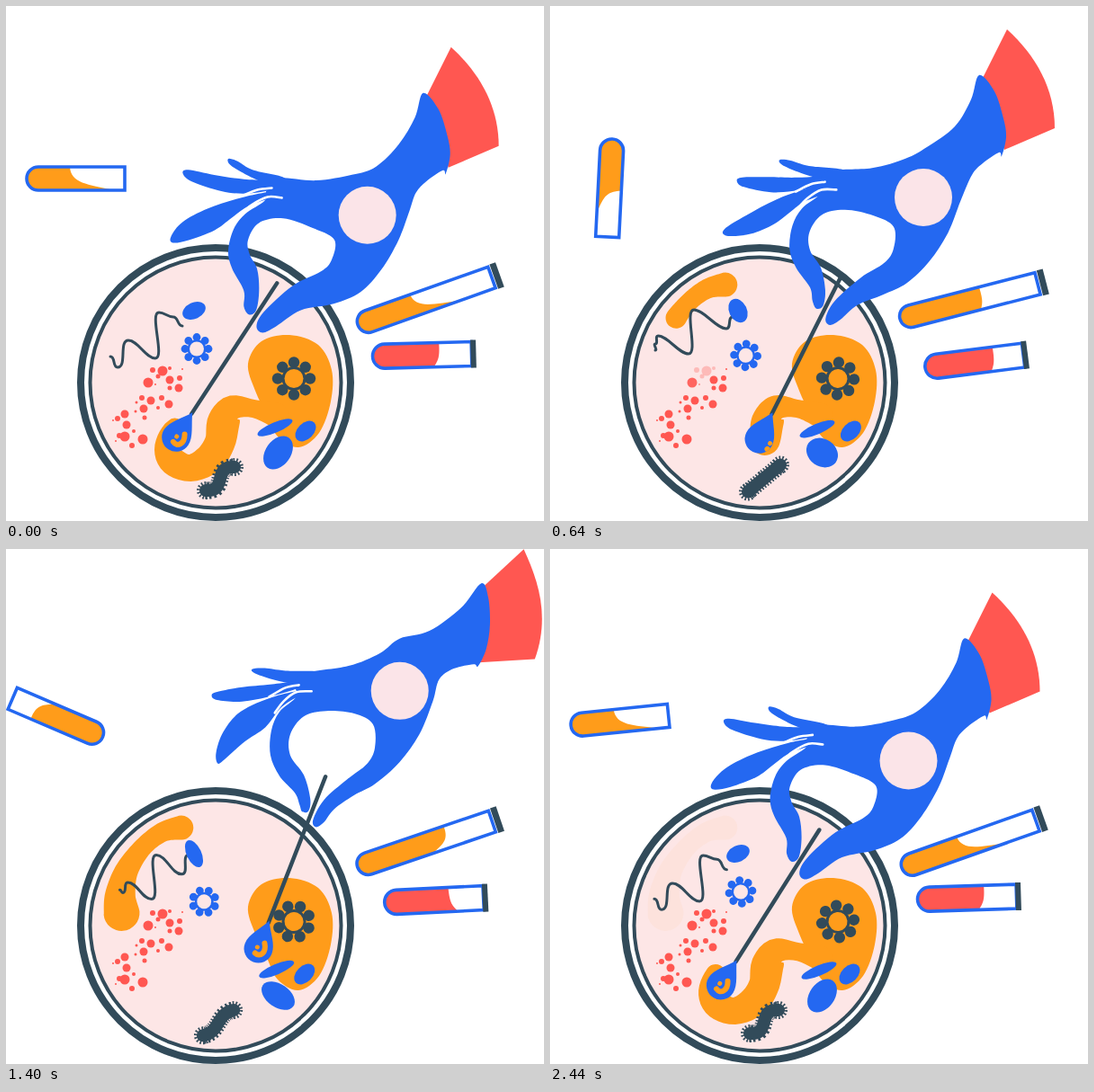
Recreate the animation shown at these times as an HTML page. Size 598x573 px, loop 2.48 s.

```html
<!DOCTYPE html>
<html lang="en">
<head>
<meta charset="utf-8">
<title>Petri dish</title>
<style>
html, body { margin: 0; width: 100%; height: 100%; overflow: hidden; background: #fff; }
svg { display: block; }
</style>
</head>
<body>
<svg id="stage" width="598" height="573" viewBox="0 0 598 573"></svg>
<script>
const LOOP = 2480, STEP = 40;
const BLUE = '#2468f1', ORANGE = '#ff9c1a', RED = '#ff5751', DARK = '#324b5a', PINK = '#fde6e6';
const stage = document.getElementById('stage');

function set(node, attrs) {
  for (const k in attrs) node.setAttribute(k, attrs[k]);
  return node;
}
function add(tag, attrs, parent = stage) {
  return parent.appendChild(set(document.createElementNS('http://www.w3.org/2000/svg', tag), attrs));
}
const fill = (color, parent) => add('path', { fill: color }, parent);
const line = (color, width, parent) => add('path', {
  fill: 'none', stroke: color, 'stroke-width': width, 'stroke-linecap': 'round', 'stroke-linejoin': 'round'
}, parent);
const pts = s => s.split(' ').map(p => p.split(',').map(Number));
const lerp = (a, b, k) => a + (b - a) * k;
const mix = (a, b, k) => a.map((v, i) => lerp(v, b[i], k));
const clamp = (v, a, b) => Math.max(a, Math.min(b, v));
const fmt = p => p.map(v => v.toFixed(2)).join(' ');

// Smooth looping track through rows of [time, ...values]
function track(rows, t) {
  const n = rows.length;
  t = ((t % LOOP) + LOOP) % LOOP;
  let i = n - 1;
  while (rows[i][0] > t) i--;
  const at = j => {
    const r = rows[(j + n) % n], turn = Math.floor(j / n) * LOOP;
    return [r[0] + turn, ...r.slice(1)];
  };
  const [a, b, c, d] = [at(i - 1), at(i), at(i + 1), at(i + 2)];
  const w = c[0] - b[0], k = (t - b[0]) / w, k2 = k * k, k3 = k2 * k;
  return b.slice(1).map((v, j) => {
    j++;
    const m0 = (c[j] - a[j]) / (c[0] - a[0]) * w, m1 = (d[j] - b[j]) / (d[0] - b[0]) * w;
    return v * (2 * k3 - 3 * k2 + 1) + m0 * (k3 - 2 * k2 + k) + c[j] * (3 * k2 - 2 * k3) + m1 * (k3 - k2);
  });
}

// Rounded path through points
function smooth(p, closed = true) {
  const n = p.length, get = i => closed ? p[(i + n) % n] : p[clamp(i, 0, n - 1)];
  let d = 'M' + fmt(p[0]);
  for (let i = 0; i < (closed ? n : n - 1); i++) {
    const [a, b, c, e] = [get(i - 1), get(i), get(i + 1), get(i + 2)];
    d += 'C' + fmt(b.map((v, j) => v + (c[j] - a[j]) / 6)) + ' ' +
      fmt(c.map((v, j) => v - (e[j] - b[j]) / 6)) + ' ' + fmt(c);
  }
  return d + (closed ? 'Z' : '');
}

// Point [x, y, radius] on a curve at index u
function along(p, u) {
  u = clamp(u, 0, p.length - 1);
  const i = Math.min(Math.floor(u), p.length - 2), k = u - i;
  const a = p[Math.max(i - 1, 0)], b = p[i], c = p[i + 1], d = p[Math.min(i + 2, p.length - 1)];
  return b.map((v, j) => v + .5 * k * (c[j] - a[j] +
    k * (2 * a[j] - 5 * v + 4 * c[j] - d[j] + k * (3 * (v - c[j]) + d[j] - a[j]))));
}

// Smear of changing width, drawn up to index end
function ribbon(p, end) {
  if (end < .02) return '';
  const left = [], right = [], n = 48;
  let r0, r1;
  for (let i = 0; i <= n; i++) {
    const u = end * i / n, [x, y, r] = along(p, u);
    const a = along(p, u - .02), b = along(p, u + .02);
    const dx = b[0] - a[0], dy = b[1] - a[1], l = Math.hypot(dx, dy) || 1;
    left.push([x + dy / l * r, y - dx / l * r]);
    right.unshift([x - dy / l * r, y + dx / l * r]);
    if (!i) r0 = r;
    r1 = r;
  }
  return 'M' + left.map(fmt).join('L') + `A${r1} ${r1} 0 0 1 ` + right.map(fmt).join('L') +
    `A${r0} ${r0} 0 0 1 ${fmt(left[0])}Z`;
}

// ---- Dish
add('circle', { cx: 233, cy: 419, r: 150, fill: '#fff', stroke: DARK, 'stroke-width': 8 });
add('circle', { cx: 233, cy: 419, r: 139.5, fill: PINK, stroke: DARK, 'stroke-width': 4 });

const arcPts = pts('195,310,13.5 174,315,11 152,332,10.5 134,358,13 127,385,17 128.5,405,20');
const arc = fill(ORANGE);
const arcKeys = [[0, 0], [380, 0], [440, .45], [640, 2.6], [1120, 5], [1300, 5], [2470, 5]];

// x, y, radius, moment of blinking
const dots = pts('174,406,5.5,640 182,403,2,640 163,405,3,640 169,412,2.5,640 158,419,5.5,760 ' +
  '182,416,4.5,880 193,414,3,1000 192,425,4.5,1120 182,425,2.5,1000 196,404,1,1000 166,421,1,700 ' +
  '181,443,4.5,440 173,436,3,400 169,447,2,1120 161,439,4.5,1640 151,436,3,1600 153,448,4.5,1700 ' +
  '145,441,1.5,1640 144,451,1.5,1800 154,458,2.5,1800 132,454,4.5,2080 124,459,3,2040 134,466,4.5,2080 ' +
  '142,473,2,2120 126,478,3,2080 132,479,5.5,2100 140,489,3,2140 152,482,5.5,2200 119,461,1,2000 122,484,1,2080')
  .map(([cx, cy, r, at]) => ({ at, node: add('circle', { cx, cy, r, fill: RED }) }));

const squiggle = line(DARK, 3);
const squiggleKeys = [
  [0, 116, 390, 124, 402, 136, 372, 166, 392, 170, 341, 186, 346, 196, 356],
  [440, 116, 384, 116, 383, 119, 378, 143, 395, 150, 348, 190, 378, 193, 340],
  [640, 117, 383, 117, 376, 120, 367, 154, 387, 160, 338, 196, 359, 203, 346],
  [1120, 124, 377, 130, 382, 138, 359, 174, 381, 177, 328, 192, 337, 205, 349],
  [1640, 127, 383, 128, 382, 131, 381, 151, 397, 158, 351, 199, 383, 203, 336],
  [2080, 122, 391, 126, 380, 131, 373, 163, 395, 167, 343, 204, 368, 212, 362],
  [2420, 116, 389, 124, 400, 136, 372, 166, 392, 170, 341, 186, 346, 197, 357]
];
function wave(v) {
  let d = `M${v[0]} ${v[1]}`;
  for (let i = 2; i < v.length; i += 2) {
    const [x, y, u, w] = v.slice(i - 2, i + 2), h = Math.min(11, Math.hypot(u - x, w - y) * .4);
    d += `C${x + h} ${y} ${u - h} ${w} ${u} ${w}`;
  }
  return d;
}

const cell = add('ellipse', { fill: BLUE, transform: 'translate(209 339) rotate(-25)' });

function flower(color, core, petal, dist, disc, hole) {
  const g = add('g', {});
  for (let i = 0; i < 8; i++)
    add('circle', { cx: dist, r: petal, fill: color, transform: `rotate(${i * 45})` }, g);
  add('circle', { r: disc, fill: color }, g);
  add('circle', { r: hole, fill: core }, g);
  return g;
}
const blueFlower = flower(BLUE, PINK, 4.4, 13, 10.5, 8);

add('path', { fill: ORANGE, d: smooth(pts('315,366 347,377 362,405 361,440 348,475 325,491 302,479 290,455 277,428 269,398 284,373')) });
const trailPts = pts('300,455,14 275,448,10 252,447,14 242,462,18 238,485,17 226,504,17 205,514,15 186,507,15.5 179,492,14 184,473,11 196,460,7');
const trail = fill(ORANGE);
const darkFlower = flower(DARK, ORANGE, 6.2, 18, 13.5, 10.5);
const leafA = add('ellipse', { rx: 21, ry: 5.8, fill: BLUE });
const leafB = add('ellipse', { rx: 13.5, ry: 9, fill: BLUE });
const bean = add('ellipse', { fill: BLUE, transform: 'translate(302.5 497) rotate(-55)' });
// roundness of the cells, leaf shift, bug bend
const cellKeys = [[0, 1, 0, 1], [440, .55, -2, 0], [640, .3, -2, 0], [1120, 0, 0, 1],
  [1640, .05, 3, .1], [2080, .55, 3, 0], [2440, 1, 0, 1]];

const bugHair = add('path', { fill: 'none', stroke: DARK, 'stroke-width': 19, 'stroke-dasharray': '1.6 2' });
const bugTips = [0, 1].map(() => add('circle', { r: 8, fill: 'none', stroke: DARK, 'stroke-width': 4, 'stroke-dasharray': '1.6 2' }));
const bugBody = line(DARK, 14);

const drop = add('path', { fill: ORANGE, d: 'M0 0C7 12 9 26 8 38A8 8 0 0 1 -8 38C-7 24 -3 12 0 0Z' });

// ---- Swab
const stick = line(DARK, 4.5);
const headShape = 'M0 -2C6 10 16 20 16 31A16 16 0 0 1 -16 31C-16 20 -6 10 0 -2Z';
add('path', { d: headShape }, add('clipPath', { id: 'head' }));
const head = add('g', {});
add('path', { d: headShape, fill: BLUE }, head);
const swirl = add('g', {}, add('g', { 'clip-path': 'url(#head)' }, head));
set(line(ORANGE, 6, swirl), { d: 'M3 -8C9 1 4 9 -3 6' });
add('circle', { cx: -3, cy: -1, r: 2.5, fill: ORANGE }, swirl);
const swirlKeys = [[0, 3], [440, -13], [640, 16], [1120, -12], [1640, 12], [2080, -14], [2440, 1]];

// ---- Hand: low and high poses, relative to the badge
const low = s => pts(s).map(([x, y]) => [x - 402, y - 233]);
const high = s => pts(s).map(([x, y]) => [x - 437, y - 159]);
const cuff = [low('495,46 527,75 548,112 548,156 492,180 468,100'),
  high('574,1 590,35 604,75 587,123 525,127 529,43')];
const body = [
  low('464,97 481,115 491,145 494,166 489,187 486,183 468,195 456,208 449,228 437,260 418,293 395,318 ' +
    '365,331 328,338 300,356 285,363 278,356 286,340 318,311 350,295 362,282 365,260 341,247 308,236 ' +
    '281,241 269,260 271,276 279,292 281,315 278,337 270,343 264,334 264,316 251,291 247,272 253,248 ' +
    '266,231 288,216 290,205 300,191 345,194 385,188 412,179 437,154 455,124'),
  high('527,39 535,55 537,85 533,112 524,131 519,129 497,134 481,146 474,170 459,207 437,238 410,262 ' +
    '386,275 364,290 352,305 343,310 340,302 352,280 378,257 400,240 409,222 407,196 386,184 355,181 ' +
    '330,187 315,207 315,230 330,252 337,278 335,292 328,293 325,285 320,272 303,253 293,230 294,203 ' +
    '303,182 322,165 320,150 330,139 380,131 415,117 437,101 470,92 505,66')
];
const little = [low('310,191 275,182 258,172 248,169 249,175 262,184 280,193 310,204'),
  high('355,138 310,136 287,133 273,134 277,139 298,146 318,150 345,152')];
const ring = [low('315,195 265,192 232,187 203,181 197,185 207,194 240,205 268,208 300,203'),
  high('345,145 295,151 262,154 234,159 228,163 234,168 262,170 295,164 325,155')];
const long = [low('310,204 265,212 224,225 196,240 184,256 186,263 203,260 232,249 250,236 270,222 300,211'),
  pts('310,227 285,228 240,243 205,261 180,276 183,283 210,281 237,270 258,254 272,245 300,235').map(([x, y]) => [x - 402, y - 242]),
  high('350,154 300,164 261,181 241,203 232,226 234,238 243,233 265,214 288,198 306,176 330,162')];
const creaseA = [low('296,202 280,204 264,210'), high('325,152 310,155 292,165')];
const creaseB = [low('307,213 291,212 273,221 259,233'), high('339,159 322,160 308,170 298,183')];

const hand = add('g', {});
const cuffNode = fill(RED, hand);
const [littleNode, ringNode, longNode, bodyNode] = [0, 0, 0, 0].map(() => fill(BLUE, hand));
const creases = [line('#fff', 2.6, hand), line('#fff', 2.6, hand)];
add('circle', { r: 32, fill: '#fbe4e8' }, hand);

// delay from the turning point, x, y, finger pose, arm pose, smear length
const there = [
  [0, 403, 232, 0, 0, 9.4], [70, 398.5, 235.5, .1, 0, 9], [220, 390, 250, .28, -.02, 7],
  [410, 402, 242, .55, -.05, 4.6], [610, 415, 213, .57, 0, 3.9], [870, 426, 181, .52, .66, 1.9],
  [1090, 437, 159, 1, 1, 0], [1240, 440, 156, 1.03, 1.05, 0]
];
const back = there.slice(1, -1).reverse().map(([d, ...v]) => [LOOP - d, ...v]);
const handKeys = there.concat(back);

function pose(parts, k) {
  if (parts.length === 3) {
    const j = k < .55 ? 0 : 1;
    return parts[j].map((p, i) => mix(p, parts[j + 1][i], j ? (k - .55) / .45 : k / .55));
  }
  return parts[0].map((p, i) => mix(p, parts[1][i], k));
}

function drawHand(t) {
  const [x, y, p, q, smear] = track(handKeys, t - 30);
  set(hand, { transform: `translate(${x} ${y})` });
  const c = pose(cuff, q).map(fmt);
  set(cuffNode, { d: `M${c[0]}C${c[1]} ${c[2]} ${c[3]}L${c[4]}L${c[5]}Z` });
  const n = body[0].length;
  set(bodyNode, { d: smooth(body[0].map((a, i) => mix(a, body[1][i], i < 8 || i > n - 3 ? q : p))) });
  set(littleNode, { d: smooth(pose(little, p)) });
  set(ringNode, { d: smooth(pose(ring, p)) });
  set(longNode, { d: smooth(pose(long, p)) });
  [creaseA, creaseB].forEach((s, i) => set(creases[i], { d: smooth(pose(s, p), false) }));

  const top = mix([-101, 75], [-83, 95], p), end = mix([-197, 220], [-147, 257], p);
  const angle = Math.atan2(end[1] - top[1], end[0] - top[0]) * 180 / Math.PI - 90;
  set(stick, { d: `M${x + top[0]} ${y + top[1]}L${x + end[0]} ${y + end[1]}` });
  set(head, { transform: `translate(${x + end[0]} ${y + end[1]}) rotate(${angle})` });
  set(swirl, { transform: `translate(${track(swirlKeys, t)[0]} 31)` });
  set(trail, { d: ribbon(trailPts, smear) });
}

// ---- Tubes
function tube(len, h, color, cap) {
  const g = add('g', {}), liquid = fill(color, g);
  const bottom = `H${h}A${h} ${h} 0 0 1 ${h} ${-h}Z`;
  add('path', { d: `M${h} ${-h}H${len}V${h}${bottom}`, fill: 'none', stroke: BLUE, 'stroke-width': 3.6 }, g);
  if (cap) add('rect', { x: len + cap[0], y: -cap[2] / 2, width: cap[1], height: cap[2], fill: DARK }, g);
  return (place, a, b) => {
    set(g, { transform: place });
    set(liquid, { d: `M${h} ${-h}H${a}C${a + 1} ${h * .4} ${lerp(a, b, .4)} ${h * .5} ${b} ${h}${bottom}` });
  };
}
const spinTube = tube(109, 13, ORANGE);
const longTube = tube(158, 12.5, ORANGE, [2.5, 7, 29]);
const redTube = tube(110, 13.5, RED, [-1, 6, 31]);
const spinKeys = [[0, 48, 97], [440, 33, 104], [640, 57, 82], [1120, 82, 62], [1640, 76, 70], [2080, 60, 91], [2440, 49, 97]];
const longKeys = [[0, 66, 118], [440, 85, 96], [640, 94, 90], [1120, 108, 83], [1640, 99, 88], [2080, 80, 101], [2440, 69, 117]];
const redKeys = [[0, 462.5, 388.5, -1.5, 74, 68], [440, 468, 395.5, -6.5, 76, 73], [640, 471.5, 395.5, -7.2, 77, 73],
  [1120, 474.5, 392, -1, 71, 84], [1640, 475.5, 390, -5, 73, 77], [2080, 469, 388, -5.3, 77, 74], [2440, 463.5, 388.3, -1.8, 74, 68]];

function drawTubes(t) {
  const turn = t / LOOP;
  spinTube(`translate(67 192) rotate(${turn * 360}) translate(-44 0)`, ...track(spinKeys, t));
  const tilt = -17 - 2.6 * Math.cos(turn * 4 * Math.PI);
  longTube(`translate(465.5 328.5) rotate(${tilt}) translate(-79 0)`, ...track(longKeys, t));
  const [x, y, a, ...level] = track(redKeys, t);
  redTube(`translate(${x} ${y}) rotate(${a}) translate(-55 0)`, ...level);
}

function drawDish(t) {
  const grown = t < 380 ? 0 : clamp(track(arcKeys, t)[0], 0, 5);
  set(arc, { d: ribbon(arcPts, grown), opacity: clamp((LOOP - t) / 830, 0, 1) });
  const fall = (t - 440) / 120;
  const size = clamp(Math.min((t - 320) / 100, (560 - t) / 100), 0, 1);
  set(drop, { transform: `translate(${144 + fall * 40} ${271 + fall * 48}) rotate(-18) scale(${size})` });

  for (const { at, node } of dots) {
    const k = clamp(1 - Math.abs(t - at) / 140, 0, 1);
    set(node, { opacity: 1 - .7 * k });
  }
  set(squiggle, { d: wave(track(squiggleKeys, t)) });

  const [m, shift, rawBend] = track(cellKeys, t), bend = clamp(rawBend, 0, 1);
  set(cell, { rx: 8.3 + 5.2 * m, ry: 16 - 7 * m });
  set(bean, { rx: 13 + 7.5 * m, ry: 20.5 - 6.5 * m });
  set(leafA, { transform: `translate(${299 + shift} ${469 - shift * .8}) rotate(-23)` });
  set(leafB, { transform: `translate(${333 - shift * .7} 473) rotate(-45)` });

  const spin = t / LOOP * 360;
  set(blueFlower, { transform: `translate(${220 - 8 * m} ${392 - 10.5 * m}) rotate(${spin})` });
  set(darkFlower, { transform: `translate(320 414.5) rotate(${spin})` });

  const swing = Math.cos(t / LOOP * 2 * Math.PI) * bend;
  const a = [220 + swing * 2, 540.5 - swing * 1.5], b = [lerp(256, 252.5, bend) + swing * 1.5, lerp(510.5, 514, bend) - swing];
  const c = mix(mix(a, b, 1 / 3), [a[0] + 25, a[1] + 2], bend);
  const e = mix(mix(a, b, 2 / 3), [b[0] - 25, b[1] - 2], bend);
  const d = `M${fmt(a)}C${fmt(c)} ${fmt(e)} ${fmt(b)}`;
  set(bugHair, { d });
  set(bugBody, { d });
  [a, b].forEach(([cx, cy], i) => set(bugTips[i], { cx, cy }));
}

const start = performance.now();
function draw() {
  const t = Math.floor(((performance.now() - start) % LOOP) / STEP) * STEP;
  drawDish(t);
  drawHand(t);
  drawTubes(t);
  requestAnimationFrame(draw);
}
draw();
</script>
</body>
</html>
```
